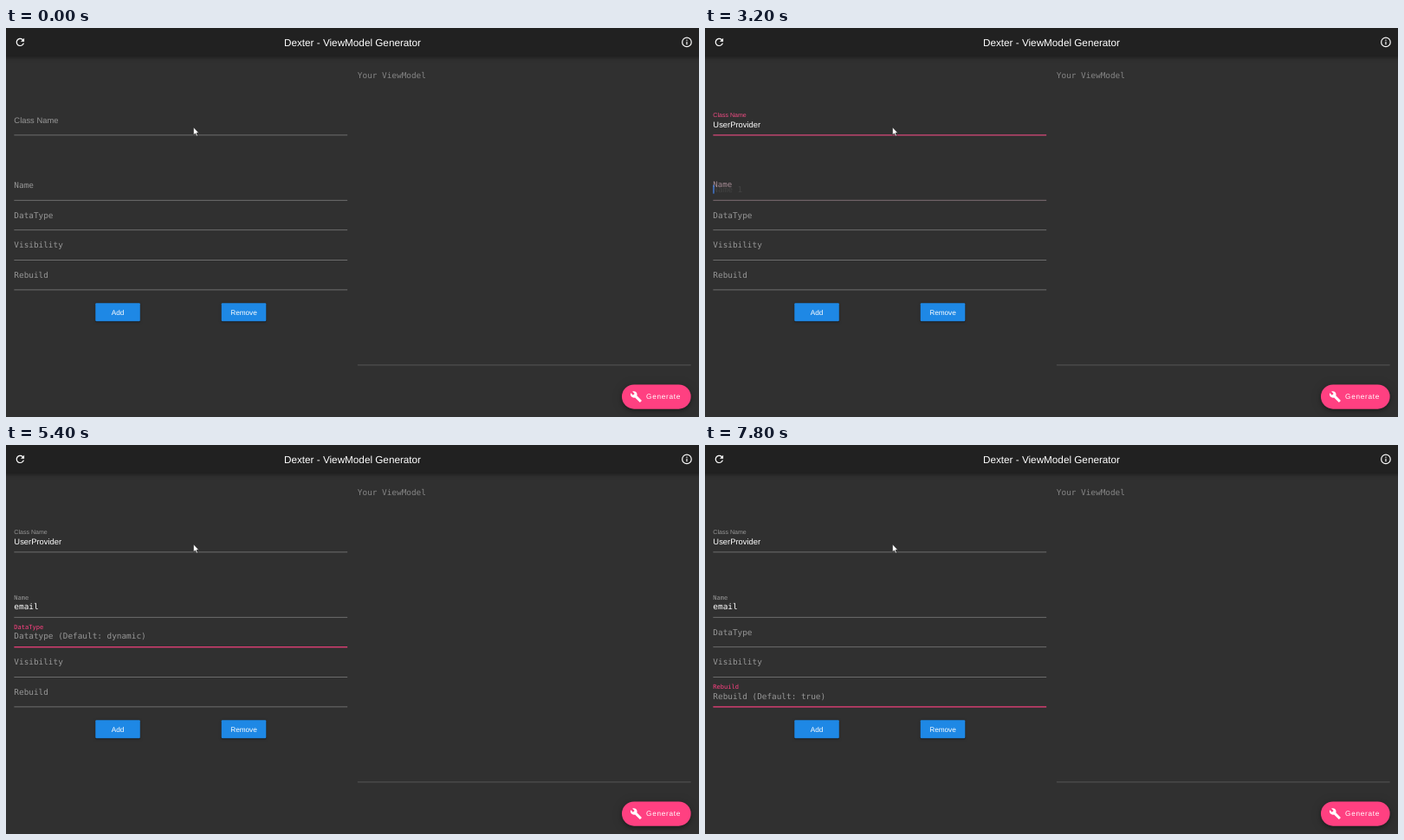
These frames come from a looping animation (800x450 px, 8000 ms). An HTML page:

```html
<!DOCTYPE html>
<html lang="en">
<head>
<meta charset="utf-8">
<title>ViewModel Generator</title>
<style>
  html, body { margin: 0; width: 100%; height: 100%; overflow: hidden; background: #303030; }
  svg { display: block; width: 100vw; height: 100vh; }
  text { font: 16px "Liberation Sans", Arial, sans-serif; fill: #fff; text-rendering: geometricPrecision; }
  .mono { font-family: "DejaVu Sans Mono", monospace; }
  .title { font-size: 20px; }
  .small { font-size: 14px; }
  .spaced { letter-spacing: 1.25px; }
  .hint { fill: #979797; }
  .bar { filter: drop-shadow(0 3px 3px rgba(0, 0, 0, .25)) drop-shadow(0 1px 5px rgba(0, 0, 0, .15)); }
  .raised { filter: drop-shadow(0 2px 1px rgba(0, 0, 0, .25)) drop-shadow(0 1px 2.5px rgba(0, 0, 0, .25)); }
  .fab { filter: drop-shadow(0 4px 4px rgba(0, 0, 0, .25)) drop-shadow(0 2px 9px rgba(0, 0, 0, .22)); }
</style>
</head>
<body>
<svg viewBox="0 0 1366 768" preserveAspectRatio="none">
  <rect width="1366" height="768" fill="#303030"/>

  <rect class="bar" x="-20" y="-20" width="1406" height="76" fill="#212121"/>
  <text class="title" x="683" y="35" text-anchor="middle">Dexter - ViewModel Generator</text>
  <path transform="translate(16 16)" fill="#fff" d="M17.65 6.35C16.2 4.9 14.21 4 12 4c-4.42 0-7.99 3.58-7.99 8s3.57 8 7.99 8c3.73 0 6.84-2.55 7.73-6h-2.08c-.82 2.33-3.04 4-5.65 4-3.31 0-6-2.69-6-6s2.69-6 6-6c1.66 0 3.14.69 4.22 1.78L13 11h7V4z"/>
  <g transform="translate(1342 28)" fill="#fff">
    <circle r="9" fill="none" stroke="#fff" stroke-width="2"/>
    <path d="M-1-1h2v6h-2zM-1-5h2v2h-2z"/>
  </g>

  <text class="mono" x="693" y="99.5" style="fill:#868686">Your ViewModel</text>
  <rect x="693" y="665" width="657" height="1" fill="#6e6e6e"/>

  <g id="fields"></g>
  <rect id="caret" width="2" height="17" fill="#4285f4"/>

  <g class="raised" fill="#1e88e5">
    <rect x="176.3" y="543" width="88" height="36" rx="2"/>
    <rect x="424.7" y="543" width="88" height="36" rx="2"/>
  </g>
  <g text-anchor="middle">
    <text class="small" x="220.3" y="566">Add</text>
    <text class="small" x="468.7" y="566">Remove</text>
  </g>

  <rect class="fab" x="1214" y="704" width="136" height="48" rx="24" fill="#ff4081"/>
  <path transform="translate(1230 716)" fill="#fff" d="M22.7 19l-9.1-9.1c.9-2.3.4-5-1.5-6.9-2-2-5-2.4-7.4-1.3L9 6 6 9 1.6 4.7C.4 7.1.9 10.1 2.9 12.1c1.9 1.9 4.6 2.4 6.9 1.5l9.1 9.1c.4.4 1 .4 1.4 0l2.3-2.3c.5-.4.5-1.1.1-1.4z"/>
  <text class="small spaced" x="1262" y="733">Generate</text>

  <g transform="scale(1.7075)">
    <path id="arrow" d="M216.4 114.6v9.2l2.1-1.9 1.5 3.2 1.4-.6-1.4-3.1h2.7z" fill="#fff" stroke="#1c1c1c" stroke-width=".6"/>
    <g id="beam" fill="none">
      <path d="M215 111.6h4M217 111.6v7.6M215 119.2h4" stroke="#ccc" stroke-width="1.7"/>
      <path d="M215 111.6h4M217 111.6v7.6M215 119.2h4" stroke="#222" stroke-width=".6"/>
    </g>
  </g>
</svg>
<script>
const LOOP = 8000, STEP = 100, LEFT = 16;
const GREY = [151, 151, 151], PINK = [255, 64, 129];

// keys: the moment each character of the value appears
const fields = [
  { label: "Class Name", hint: "Class Name", base: 211.5, focus: 200, dur: 300, value: "UserProvider",
    keys: [1300, 1400, 1500, 1600, 1900, 2000, 2100, 2200, 2300, 2400, 2500, 2600],
    blink: [[200, 700], [1200, 3200]] },
  { label: "Name", hint: "Name 1", base: 340, focus: 3200, dur: 300, value: "email",
    keys: [4100, 4200, 4300, 4400, 4600], blink: [[3200, 3700], [4100, 5000]] },
  { label: "DataType", hint: "Datatype (Default: dynamic)", base: 399, focus: 5000, dur: 300,
    blink: [[5000, 5400], [5900, 6300]] },
  { label: "Visibility", hint: "Visibility (Default: private)", base: 458, focus: 6200, dur: 680,
    blink: [[6300, 6800]] },
  { label: "Rebuild", hint: "Rebuild (Default: true)", base: 517, focus: 7300, dur: 250,
    blink: [[7300, 7800]] }
];

const byId = id => document.getElementById(id);
const lerp = (a, b, p) => a + (b - a) * p;
const mix = p => `rgb(${GREY.map((c, i) => Math.round(lerp(c, PINK[i], p)))})`;
const clamp = x => Math.max(0, Math.min(1, x));

// cubic-bezier(.4, 0, .2, 1)
function ease(x) {
  if (x <= 0 || x >= 1) return clamp(x);
  let lo = 0, hi = 1, s;
  for (let i = 0; i < 14; i++) {
    s = (lo + hi) / 2;
    const at = 3 * s * (1 - s) * (1 - s) * .4 + 3 * s * s * (1 - s) * .2 + s * s * s;
    if (at < x) lo = s; else hi = s;
  }
  return s * s * (3 - 2 * s);
}

function add(tag, attrs, content = "") {
  const el = document.createElementNS("http://www.w3.org/2000/svg", tag);
  for (const key in attrs) el.setAttribute(key, attrs[key]);
  el.textContent = content;
  return byId("fields").appendChild(el);
}

fields.forEach((f, i) => {
  const font = i ? "mono" : "";
  f.line = add("rect", { x: LEFT, width: 657 });
  f.labelEl = add("text", { class: font, x: LEFT }, f.label);
  f.hintEl = add("text", { class: font + " hint", x: LEFT, y: f.base - 16 }, f.hint);
  f.valueEl = add("text", { class: font, x: LEFT, y: f.base - 16 });
});

const started = (f, t) => f && t >= f.focus ? ease((t - f.focus + 60) / f.dur) : 0;

function draw(t) {
  const caret = byId("caret");
  caret.style.display = "none";

  fields.forEach((f, i) => {
    const entered = started(f, t), left = started(fields[i + 1], t);
    const active = entered * (1 - left);
    const typed = f.keys ? f.keys.filter(k => t >= k).length : 0;
    const raised = typed ? 1 : active;
    const thick = 1 + active;

    f.line.setAttribute("y", f.base - thick / 2);
    f.line.setAttribute("height", thick);
    f.line.setAttribute("fill", mix(active));

    f.labelEl.setAttribute("y", f.base - lerp(24, 35, raised));
    f.labelEl.style.fontSize = lerp(16, 12, raised) + "px";
    f.labelEl.style.fill = mix(active);

    f.hintEl.style.opacity = typed ? 0 : clamp(entered * 1.3) * clamp(1 - left * 2);
    f.valueEl.textContent = typed ? f.value.slice(0, typed) : "";

    if (f.blink.some(([from, to]) => t >= from && t < to)) {
      const width = typed ? f.valueEl.getComputedTextLength() : 0;
      caret.setAttribute("x", LEFT + width);
      caret.setAttribute("y", f.base - 30);
      caret.style.display = "";
    }
  });

  const overField = t >= 200 && t < 3200;
  byId("arrow").style.display = overField ? "none" : "";
  byId("beam").style.display = overField ? "" : "none";
}

const origin = performance.now();
function tick() {
  const t = (performance.now() - origin) % LOOP;
  draw(Math.floor(t / STEP) * STEP);
  requestAnimationFrame(tick);
}
tick();
</script>
</body>
</html>
```
